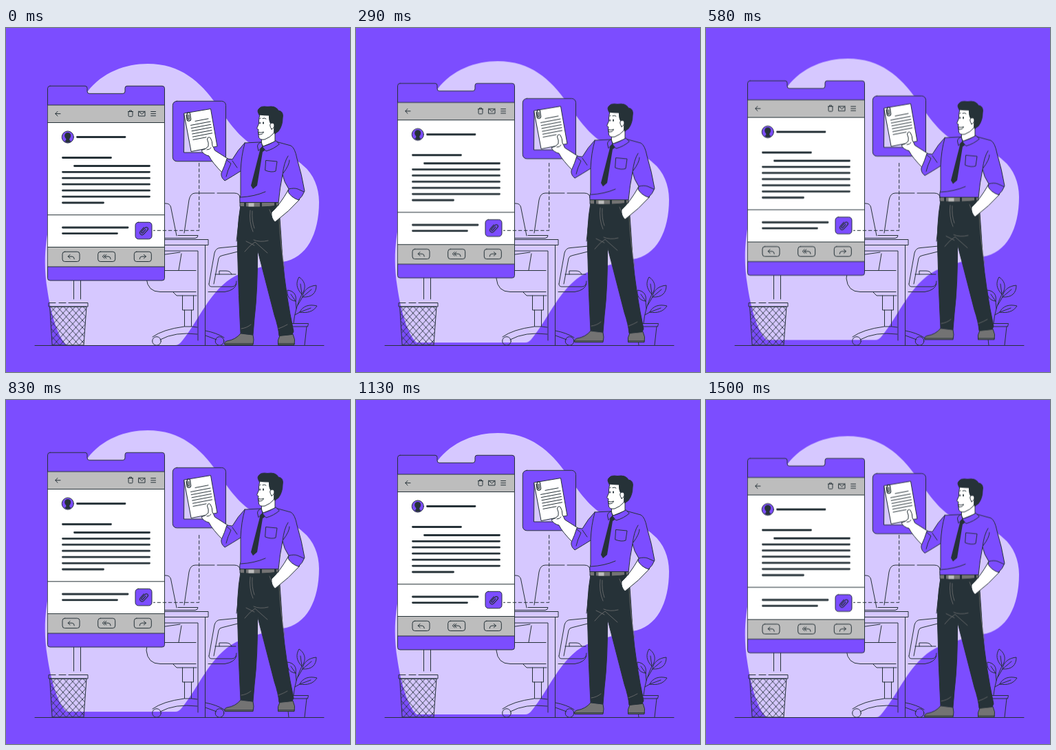
These frames come from a looping animation (500 by 500 pixels, 1.54 s). An HTML page:

```html
<!DOCTYPE html>
<html lang="en">
<head>
<meta charset="utf-8">
<title>Mail attachment</title>
<style>
  html, body { margin: 0; width: 100%; height: 100%; overflow: hidden; background: #7c4dff; }
  svg { display: block; width: 100vw; height: 100vh; }
  .float { animation: float 1540ms linear -50ms infinite; }
  @keyframes float {
    0%, 100% { transform: translateY(.65px); }
    50% { transform: translateY(-9.35px); }
  }
  .line { fill: none; stroke: #263238; stroke-width: 1; stroke-linecap: round; stroke-linejoin: round; }
  .bold { stroke-width: 2.8; }
  .purple { fill: #7c4dff; }
  .white { fill: #fff; }
  .grey { fill: #bdbdbd; }
  .dark { fill: #263238; }
  .shoe { fill: #737373; }
  .crease { fill: none; stroke: #737373; stroke-width: .8; stroke-linecap: round; }
</style>
</head>
<body>
<svg viewBox="0 0 500 500">
  <defs>
    <pattern id="mesh" width="9.4" height="10.4" x="64" y="404" patternUnits="userSpaceOnUse">
      <path d="M-1 -1.1 L10.4 11.5 M10.4 -1.1 L-1 11.5" fill="none" stroke="#263238" stroke-width=".9"/>
    </pattern>
    <path id="clip" d="M-3.5 -4 V4 A3.5 3.5 0 0 0 3.500 4 V-5 A2.600 2.600 0 0 0 -1.700 -5 V3.500 A1.300 1.300 0 0 0 .9 3.500 V-3.500"/>
    <path id="reply" d="M-1.6 -3.4 L-4.6 -.7 L-1.6 2 M-4.6 -.7 H1.4 Q4.6 -.5 4.6 3"/>
  </defs>

  <path class="float" fill="#d6c8ff" d="M118 93 C140 64 174 52 206 52 C254 52 282 78 306 111 C324 138 335 152 351 165
    C378 182 415 182 432 200 C447 212 455 232 455 253 C455 299 437 335 402 340 C375 346 352 352 334 360
    C296 380 281 425 255 456 Q251 461 246 461 H88 C75 449 65 415 60 380 C54 345 57 312 63 284 L80 150 Z"/>

  <!-- office -->
  <g class="line">
    <path d="M42 461.5 H462"/>
    <path d="M98.5 340 V394 M108.5 340 V394"/>
    <path d="M64 405 H117 L113 461 H67.5 Z" fill="url(#mesh)"/>
    <path d="M72 399.5 H62 V405 H119 V399.5 H91 M87 399.5 H77"/>
    <path d="M225 255 H232 Q238 255 239.5 260 L248 302 M225 305.5 H275 Q279 305 279 301.5 H250"/>
    <path d="M259 298 L266 250 Q268 240 275 240 H303 M307 240 H332 Q340 240 340 247 M341 260 L335 310"/>
    <path d="M225 307.5 H294 V315.5 H225 M225 324 H279 V454 M289.5 315.5 V461 M255 328 L251 352"/>
    <path d="M253 326 L225 330"/>
    <path d="M276 352.5 H214 Q204 354 204 364 Q206 383.5 224 383.5 H276 M294 383.5 H318 Q333 381 335 372"/>
    <path d="M295 372 L303 327 Q305 319.5 312 319.5 L338 317 M295 372 Q295 376 299 376 H329 Q335 375 335 368"/>
    <path d="M302 372 L309 335 Q310 331 315 330.5 L337 325 M304 358 H334 M310 358 V353 H320 Q326 353 328 358"/>
    <path d="M243 384 L248 389 H277 M256.5 389 V410 H272.5 V389 M259.5 410 V434 H269.5 V410"/>
    <path d="M259 434 Q228 438 213 449 M278 445 Q246 441 224 453 M270 434 L278 435 M290 440 Q306 443 317 450 M290 447 L306 453"/>
    <circle cx="219" cy="455" r="6.3"/><circle cx="310.5" cy="455" r="6.3"/>
  </g>

  <!-- plant -->
  <g class="line">
    <path d="M405 429.5 H439.5 L438.5 434 H405 M408 434 L411 461 M437 434 L434 461"/>
    <path d="M418 429 Q420 408 430 387 L428 372 M424 403 L431 391 L444 380 M420 417 L427 413 L443 407 M422 408 L421 397 L414 387"/>
    <path d="M430 387 C422 379 421 370 426 362 C435 368 437 378 430 387 Z"/>
    <path d="M431 391 C432 381 440 375 451 374 C451 385 445 392 431 391 Z"/>
    <path d="M427 413 C431 404 441 401 452 404 C447 412 438 415 427 413 Z"/>
    <path d="M421 397 C411 396 408 388 409 381 C418 382 423 388 421 397 Z"/>
  </g>

  <!-- phone -->
  <g class="float">
    <path class="line purple" d="M64 84.3 H115 Q118 84.3 118 87.3 V92 Q118 95.3 121 95.3 H170 Q173 95.3 173 92 V87.3
      Q173 84.3 176 84.3 H227 Q230.5 84.3 230.5 87.8 V363.5 Q230.5 367 227 367 H64 Q60.5 367 60.5 363.5 V87.8 Q60.5 84.3 64 84.3 Z"/>
    <g class="line">
      <rect class="grey" x="60.5" y="112" width="170" height="25.5"/>
      <rect class="white" x="60.5" y="137.5" width="170" height="181"/>
      <rect class="grey" x="60.5" y="318.5" width="170" height="28.5"/>
      <path d="M60.5 271.7 H230.5"/>
      <path d="M79 124.6 H72 M75 121.3 L71.7 124.6 L75 128"/>
      <path d="M177.5 121.5 H184.5 M179.5 121 V120 H182.5 V121 M178 122 V127.5 Q178 128.7 179.5 128.7 H182.5 Q184 128.7 184 127.5 V122"/>
      <path d="M193 121.3 H202 V128 H193 Z L197.5 125.2 L202 121.3"/>
      <path d="M210.7 121.5 H217.5 M210.7 124.6 H217.5 M210.7 127.7 H217.5"/>
      <circle class="purple" cx="89.8" cy="158.5" r="8.6"/>
    </g>
    <path class="dark" d="M89.8 152 C95 152 95.5 158 92.3 161 V163 L94.5 164.5 Q90 168.5 85.2 164.5 L87.3 163 V161 C84 158 84.5 152 89.8 152 Z"/>
    <path class="line bold" d="M103.5 158.5 H173 M82.5 188.5 H152.5 M99.5 200.5 H208.5 M82.5 209.3 H208.5
      M82.5 218.2 H208.5 M82.5 227.2 H208.5 M82.5 236.2 H208.5 M82.5 245.1 H208.5 M82.5 254 H141.5
      M82.5 290 H177 M82.5 298.6 H161.5"/>
    <g class="line">
      <rect class="purple" x="188" y="282.3" width="24" height="24.5" rx="4.5"/>
      <use href="#clip" transform="translate(200.300 294.800) rotate(42) scale(.92)" stroke-width="1.3"/>
      <rect x="82" y="325.2" width="25" height="14.3" rx="3.5"/>
      <rect x="133.7" y="325.2" width="25" height="14.3" rx="3.5"/>
      <rect x="186.3" y="325.2" width="25" height="14.3" rx="3.5"/>
      <use href="#reply" x="94.7" y="332.8"/>
      <use href="#reply" x="147.5" y="332.8"/>
      <path d="M143.2 329.4 L140.2 332.1 L143.2 334.8"/>
      <use href="#reply" transform="translate(198.8 332.8) scale(-1 1)"/>
    </g>
  </g>

  <!-- attachment and man -->
  <g class="float">
    <g class="line">
      <rect class="purple" x="242.3" y="106.3" width="77.2" height="87.5" rx="6"/>
      <path fill="#d6c8ff" d="M259 125 L258.5 181 H300 L296 140 Z"/>
      <path class="white" d="M259 124 L297.5 117.5 L307 172 L269.5 179.5 Z"/>
      <path d="M275 135.4 L294 131.8 M268.5 141.4 L297 136 M269.2 145.6 L297.8 140.2 M270 149.8 L298.5 144.4
        M270.7 154 L299 148.6 M271.4 158.2 L299.5 152.8 M272 162.4 L291 158.8"/>
      <use href="#clip" transform="translate(265.300 129) rotate(-8) scale(.82)" stroke-width="1.5"/>
    </g>

    <!-- raised arm -->
    <g class="line">
      <path class="white" d="M315 211 Q300 196 295 186 Q287 184 284 178 Q291 176 294 172 Q295 167 292.5 162 Q293.5 157 297 159.5
        Q300 164 300 171 Q302 174 303.5 178 L324 191 Z"/>
      <path d="M292 177 Q296 177 298 174"/>
    </g>

    <!-- shoes and trousers -->
    <g class="line">
      <path class="shoe" d="M341 444 L359 446 Q361 453 359 460.5 H318 Q316 457 321 455 Q334 453 341 444 Z"/>
      <path class="shoe" d="M398 447 L417 445 Q421 453 419 460.5 H395.5 Q394 454 398 447 Z"/>
      <path d="M318 458.7 H359 M395.5 458.7 H419.5"/>
      <path class="dark" d="M341 258 L396.5 257 Q399 290 402 336 Q407 390 418 441 L416 445.5 L397 447.5 Q396 435 390 417
        L365.5 322 Q366 380 361 422 L359 446 L341 443.5 Q338 385 337 340 Q334.5 295 341 258 Z"/>
    </g>
    <path class="crease" d="M355 265 Q353 282 359 296 M358 266 Q357 280 361 291 M347 325 Q354 316 362 311 L380 327 M360 308 Q369 312 381 309
      M349 310 L361 316 M397 278 Q399 320 405 350 M396 437 Q404 434 409 431 M342 437 Q350 436 356 431 M383 264 Q387 275 390 280"/>

    <!-- pocketed arm -->
    <path class="line white" d="M410 236 L427 249 Q412 266 391 282 Q385 276 386 268 Q398 257 410 236 Z"/>

    <!-- shirt -->
    <path class="line purple" d="M347 167 L368 166 L392 165 L414 171 Q420 174 423 190 Q430 213 434 237 Q431 245 425 250 Q414 246 410 238
      L411 234 Q404 224 402 213 Q398 232 396 254 H340 Q339 248 341 243 L341 208 Q330 215 318 222 Q312 217 313 211 Q318 200 321 190
      L329 191 Q337 177 347 167 Z"/>
    <path class="line" d="M347 168 Q342 185 341 208 M402 213 Q404 195 410 186 M403 211 Q412 199 412 192 M321 192 L327 197 Q322 207 320 216
      M411 234 Q419 232 424 234 L433 238 M341 246 Q361 245 377 238 M329 193 L336 203 M378 192.5 L394 194 L392 208 Q386 210.5 377 207 Z"/>

    <!-- belt -->
    <path class="line shoe" d="M340.5 253.500 H396 V258 Q370 261.5 340.5 259.5 Z"/>
    <path class="dark" d="M346 253.5 H349 V260 H346 Z M369 253.5 H372 V260 H369 Z M390 253.5 H393 V259 H390 Z"/>
    <rect class="grey" x="352.5" y="254.5" width="8" height="5"/>

    <!-- head -->
    <g class="line">
      <path class="white" d="M372 158 L371 168 L374 172 L391 165 V150 Z"/>
      <path class="white" d="M369 125 Q367 133 367.5 139 L364.8 145.5 Q364.5 147 367 147.5 L366.5 151 L367.5 159 Q369 163 376 162 Q384 159 389 153
        L393 140 L388 122 Z"/>
      <path class="dark" d="M368 126 Q364 120 368 117 Q371 113 380 114.5 Q392 112.5 396 120 Q404 121 402 131 Q402 142 396 150 L390.500 154
        Q389 148 390 143 Q389 137 385.5 140 Q382 136 382.5 127 Q375 127 368 126 Z"/>
      <path class="white" d="M386 147 Q382 141 385 138.5 Q389 137 390 141 Q390 146 386 147 Z"/>
      <path class="white" d="M367 151.5 Q371 153 374.500 151 Q373.500 155 368 155 Z"/>
      <path d="M368.5 132 L370 131 M373 131.5 Q376 130 378 132"/>
    </g>
    <ellipse class="dark" cx="374" cy="138" rx="1" ry="1.7"/>
    <ellipse class="dark" cx="369.2" cy="138" rx=".8" ry="1.6"/>

    <!-- collar and tie -->
    <path class="dark" d="M370 172.5 L375.5 173 L376 178 L373 180 L365 229 L359 234 L356 229 L368.5 180 Z"/>
    <path class="line purple" d="M371 166 Q366 167 365.5 172 L367 178.5 L372.5 172.5 Z"/>
    <path class="line purple" d="M392 164 Q382 170 372.5 172.5 L378 179 Q389 176 397 169 Z"/>
  </g>

  <path class="line" d="M280.7 196.5 V294.3 H214.5" stroke-dasharray="4.5 3.6"/>
</svg>
</body>
</html>
```
